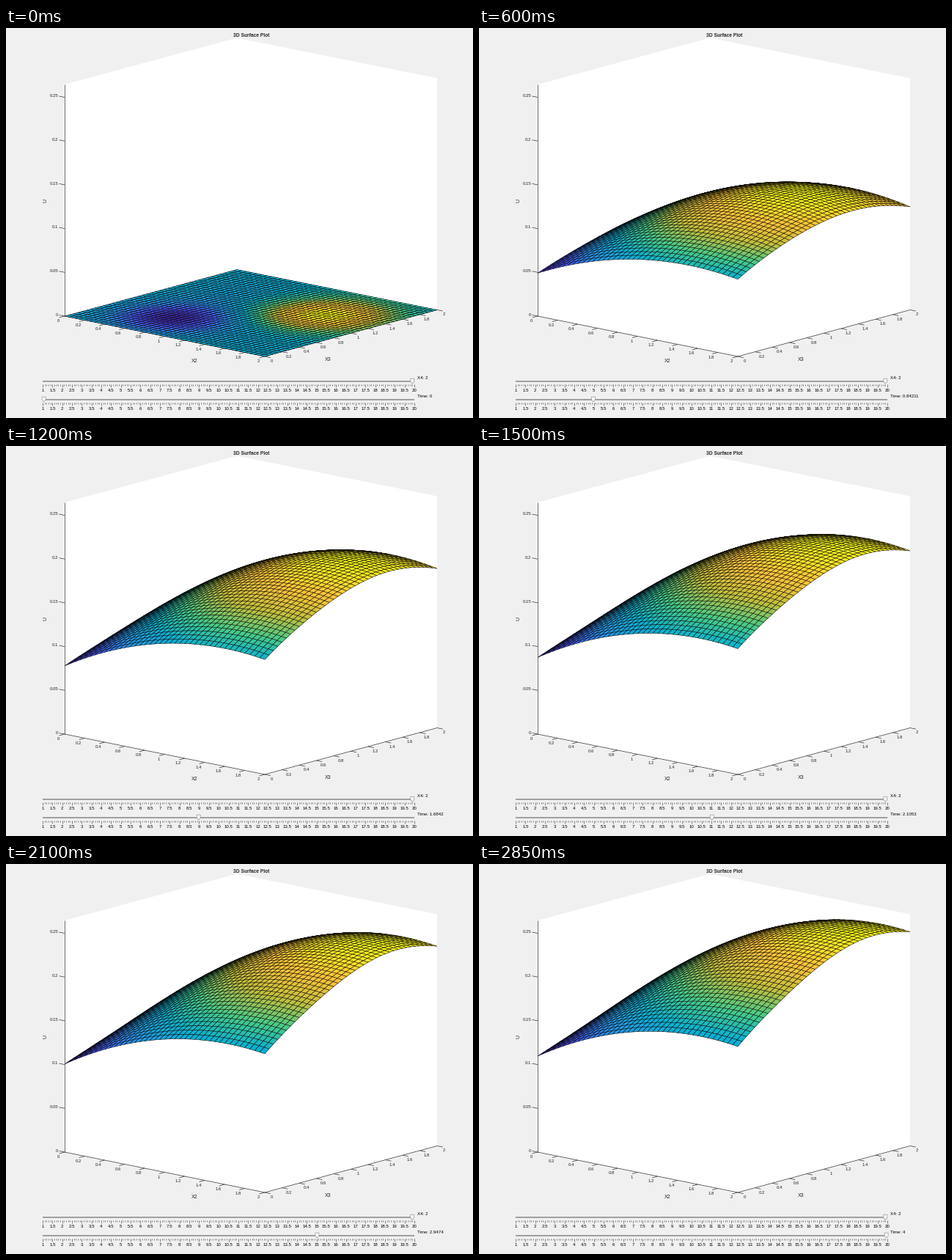
Animation of 637 by 532 pixels, one loop 3000 ms. Source, as a matplotlib script:

```python
import numpy as np
import matplotlib.pyplot as plt
from matplotlib.animation import FuncAnimation
from matplotlib.collections import LineCollection, PolyCollection
from matplotlib.colors import LinearSegmentedColormap
from matplotlib.patches import Polygon

W, H, DPI = 637, 532, 100
FRAMES, INTERVAL = 20, 150
T_END = 4
CELLS = 40
PT = 72 / DPI
INK = "#262626"

plt.rcParams["font.family"] = "Liberation Sans"
fig = plt.figure(figsize=(W / DPI, H / DPI), dpi=DPI, facecolor="#f0f0f0")
ax = fig.add_axes([0, 0, 1, 1])
ax.set_xlim(0, W)
ax.set_ylim(H, 0)
ax.axis("off")

PARULA = LinearSegmentedColormap.from_list("parula", [
    "#3e26a8", "#4757f7", "#2797eb", "#08b1d0",
    "#48cb86", "#c4bf3c", "#fec338", "#f9fb15"])


def project(a, b, z=0.0):
    """Orthographic view: box coordinates to stage pixels."""
    return 80 + 136.5 * a + 117.5 * b, 393 + 27.5 * a - 31.75 * b - 1194 * z


def label(x, y, s, size=6.0, ha="center", color=INK, **kw):
    return ax.text(x, y, s, fontsize=size * PT, ha=ha, va="center_baseline",
                   color=color, **kw)


def lines(segments, width=0.65, color=INK):
    ax.add_collection(LineCollection(segments, colors=color,
                                     linewidths=width * PT, zorder=2))


# ---- box, axes and tick labels ----
TOP = 0.2647
walls = [project(0, 0, TOP), project(0, 2, TOP), project(2, 2, TOP),
         project(2, 2), project(2, 0), project(0, 0)]
ax.add_patch(Polygon(walls, fc="white", ec="none", zorder=0))
lines([[walls[0], walls[5]], [walls[5], walls[4]], [walls[4], walls[3]]])

ticks = []
for z in np.arange(6) * 0.05:
    x, y = project(0, 0, z)
    ticks.append([(x, y), (x - 7.5, y - 1.5)])
    label(x - 9, y - 2.2, f"{z:.2g}", ha="right")
for v in np.arange(11) * 0.2:
    x, y = project(v, 0)
    ticks.append([(x, y), (x - 7.5, y + 2)])
    label(x - 8.7, y + 6.2, f"{v:.2g}")
    x, y = project(2, v)
    ticks.append([(x, y), (x + 7.8, y + 1.6)])
    label(x + 9.6, y + 6, f"{v:.2g}")
lines(ticks)

label(334.5, 9.3, "3D Surface Plot", 6.65, weight="bold")
label(257.5, 453.5, "X2", 7)
label(439.5, 451.5, "X3", 7)
ax.text(54, 236, "U", fontsize=7 * PT, rotation=90, ha="center", va="center",
        color=INK)


# ---- sliders ----
def slider_x(value):
    return 50 + (value - 1) * 507 / 19


def thumb_points(x, y):
    return [(x - 2.5, y - 3.4), (x + 2.5, y - 3.4), (x + 2.5, y + 1),
            (x, y + 3.5), (x - 2.5, y + 1)]


def slider(y, x):
    lines([[(50, y), (557, y)]], 2, "#a0a0a0")
    marks = []
    for i in range(191):
        tx = slider_x(1 + i / 10)
        marks.append([(tx, y + 4), (tx, y + (8 if i % 5 == 0 else 6.5))])
        if i % 5 == 0:
            label(tx, y + 12.6, f"{1 + i / 10:g}", 6.1, color="black")
    lines(marks, 0.65, "#404040")
    thumb = Polygon(thumb_points(x, y), fc="#f8f8f8", ec="#969696",
                    lw=0.7 * PT, zorder=5)
    ax.add_patch(thumb)
    return thumb


slider(481.7, 554.3)
time_thumb = slider(506.5, 51.5)
label(561, 477.3, "X4: 2", 6.15, "left", "black")
time_text = label(561, 502.3, "", 6.15, "left", "black")

# ---- surface ----
axis = np.linspace(0, 2, CELLS + 1)
A, B = np.meshgrid(axis, axis, indexing="ij")


def height(t):
    """Four rising corners joined by arched edges, with a low dome inside."""
    def rise(final, rate):
        return final * (1 - np.exp(-rate * t)) / (1 - np.exp(-rate * T_END))

    def mix(start, end, w):
        return start + (end - start) * w

    pulse = 0.03 * t * np.exp(-1.7 * t)
    u, v = A / 2, B / 2
    ramp = v - 0.04 * np.sin(2 * np.pi * v)
    arch_a, arch_b = A * (2 - A), B * (2 - B)
    front = mix(rise(0.1097, 0.63), rise(0.1667, 0.85), u)
    back = mix(rise(0.170, 0.72), rise(0.2446, 0.72), u)
    arch_x2 = mix(rise(0.0225, 2.3), rise(0.0262, 2.2), v)
    arch_x3 = mix(rise(0.008, 3) + pulse, rise(0.0305, 2), u)
    dome = rise(0.004, 3) + 0.4 * pulse
    return (mix(front, back, ramp) + arch_a * arch_x2 + arch_b * arch_x3
            + dome * arch_a * arch_b)


def start_shade():
    hill = np.exp(-((A - 1.43) ** 2 + (B - 1.28) ** 2) / 0.28)
    pit = np.exp(-((A - 0.63) ** 2 + (B - 0.45) ** 2) / 0.2)
    sag = np.sin(np.pi * A / 2) * np.sin(np.pi * B / 2)
    return 0.45 - 0.1 * sag + 0.65 * hill - 0.36 * pit


def cells(grid):
    """Reorder cell values from the far corner to the near one."""
    return grid[:, ::-1].reshape(-1, *grid.shape[2:])


surface = PolyCollection([], edgecolors="black", linewidths=0.5 * PT,
                         zorder=3)
ax.add_collection(surface)


def draw(n):
    t = n * T_END / (FRAMES - 1)
    z = height(t)
    shade = z if n else start_shade()
    shade = (shade - shade.min()) / np.ptp(shade)
    p = np.stack(project(A, B, z), axis=-1)
    quads = np.stack([p[:-1, :-1], p[1:, :-1], p[1:, 1:], p[:-1, 1:]], axis=2)
    surface.set_verts(cells(quads))
    surface.set_facecolor(PARULA(cells(shade[:-1, :-1])))

    # the thumb is dragged by hand, so it sways around its value
    sway = 1.6 * np.cos(2 * np.pi * n / 12)
    time_thumb.set_xy(thumb_points(slider_x(n + 1) + sway, 506.5))
    time_text.set_text(f"Time: {t:.5g}")
    return surface, time_thumb, time_text


anim = FuncAnimation(fig, draw, frames=FRAMES, interval=INTERVAL,
                     repeat=True, repeat_delay=0, blit=False)
plt.show()
```
